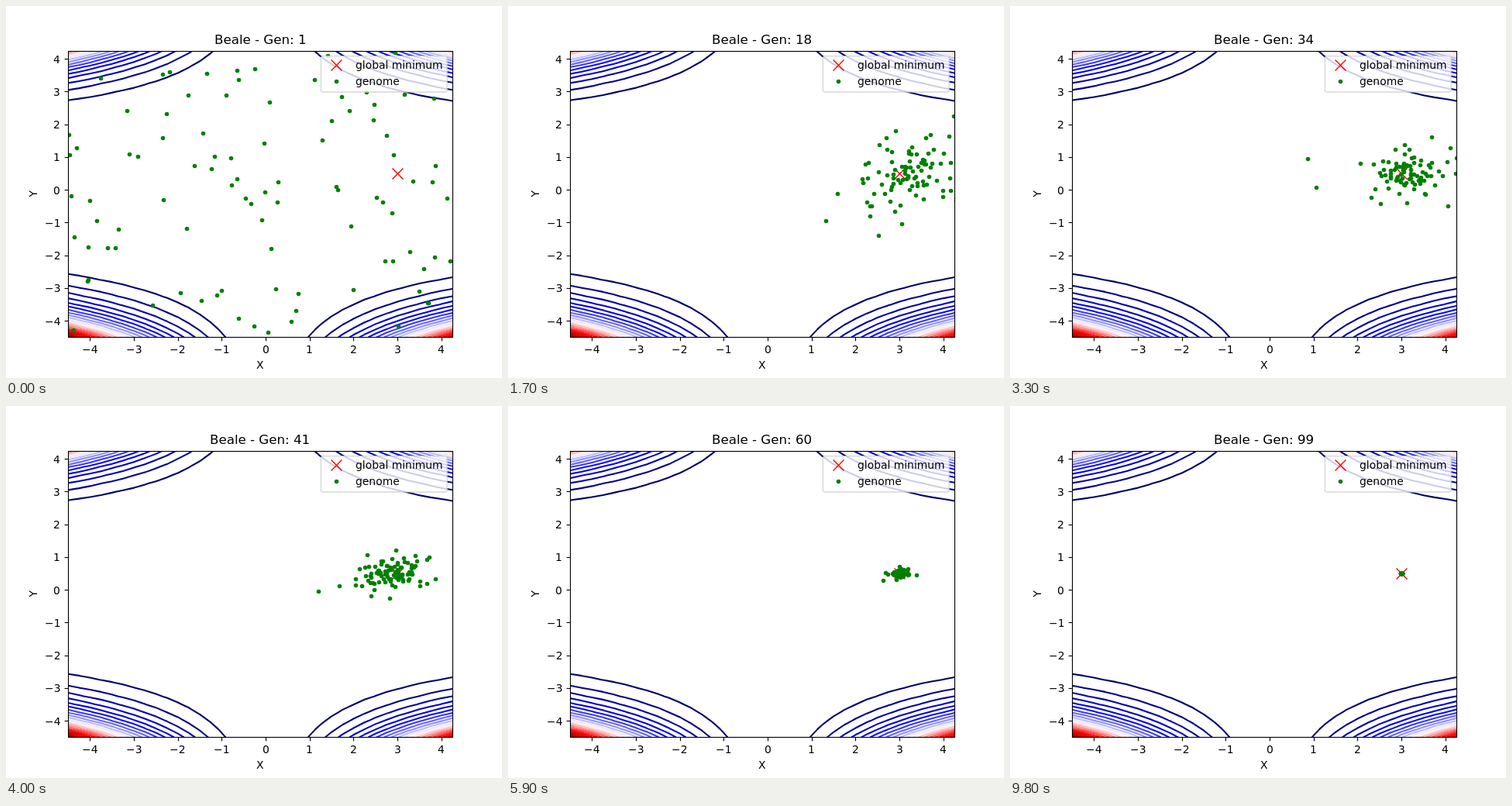
Recreate the animation shown at these times as an HTML page with a canvas. Size 640x480 px, loop 9900 ms.

```html
<!DOCTYPE html>
<html lang="en">
<head>
<meta charset="utf-8">
<title>Beale</title>
<style>
html, body { margin: 0; width: 100%; height: 100%; overflow: hidden; background: #fff; }
canvas { display: block; }
</style>
</head>
<body>
<canvas id="stage" width="640" height="480"></canvas>
<script>
const ctx = document.getElementById('stage').getContext('2d');
const LEFT = 80, TOP = 57.6, WIDTH = 496, HEIGHT = 369.6;
const MIN = -4.5, MAX = 4.25, STEP = 0.25;
const GENERATIONS = 99, POPULATION = 94;
const TAU = Math.PI * 2;

const px = x => LEFT + (x - MIN) / (MAX - MIN) * WIDTH;
const py = y => TOP + (MAX - y) / (MAX - MIN) * HEIGHT;
const snap = v => Math.round(v) + 0.5;
const beale = (x, y) =>
  (1.5 - x + x * y) ** 2 + (2.25 - x + x * y ** 2) ** 2 + (2.625 - x + x * y ** 3) ** 2;

// Blue - white - red colour map with dark ends
function seismic(v) {
  const byte = c => Math.round(255 * Math.max(0, Math.min(1, c)));
  const r = v > 0.75 ? 1 - (v - 0.75) * 2 : (v - 0.25) * 4;
  const g = v < 0.5 ? (v - 0.25) * 4 : (0.75 - v) * 4;
  const b = v < 0.25 ? 0.3 + 2.8 * v : (0.75 - v) * 4;
  return `rgb(${byte(r)},${byte(g)},${byte(b)})`;
}

// Marching squares on the sampled function
function contour(level) {
  const path = new Path2D();
  for (let x = MIN; x < MAX; x += STEP) {
    for (let y = MIN; y < MAX; y += STEP) {
      const corners = [[x, y], [x + STEP, y], [x + STEP, y + STEP], [x, y + STEP]]
        .map(([a, b]) => [a, b, beale(a, b) - level]);
      const hits = [];
      corners.forEach((p, i) => {
        const q = corners[(i + 1) % 4];
        if (p[2] > 0 === q[2] > 0) return;
        const f = p[2] / (p[2] - q[2]);
        hits.push([px(p[0] + (q[0] - p[0]) * f), py(p[1] + (q[1] - p[1]) * f)]);
      });
      for (let i = 0; i + 1 < hits.length; i += 2) {
        path.moveTo(...hits[i]);
        path.lineTo(...hits[i + 1]);
      }
    }
  }
  return path;
}

const contours = Array.from({ length: 22 }, (_, i) => {
  const level = (i + 1) * 8000;
  return { path: contour(level), color: seismic(level / 184000) };
});

// Swarm spread at key generations: generation, spread in x, spread in y
const spreads = [
  [1, 2.3, 2.1],
  [18, 0.65, 0.75],
  [41, 0.5, 0.35],
  [60, 0.13, 0.06],
  [99, 0.006, 0.004]
];

function random(seed) {
  let s = seed * 0x9E3779B1 | 0;
  return () => {
    s = s + 0x6D2B79F5 | 0;
    let t = Math.imul(s ^ s >>> 15, s | 1);
    t ^= t + Math.imul(t ^ t >>> 7, t | 61);
    return ((t ^ t >>> 14) >>> 0) / 4294967296;
  };
}

// A uniform start, then a cloud that closes in on the minimum at (3, 0.5)
function genomes(gen) {
  const rnd = random(gen);
  const crowd = place => Array.from({ length: POPULATION }, place);
  if (gen === 1) return crowd(() => [LEFT + rnd() * WIDTH, TOP + rnd() * HEIGHT]);

  const next = spreads.findIndex(s => s[0] >= gen);
  const a = spreads[next - 1], b = spreads[next];
  const f = (gen - a[0]) / (b[0] - a[0]);
  const [, sx, sy] = a.map((v, i) => v * (b[i] / v) ** f);
  const cx = 3 - 2.5 * Math.exp((1 - gen) / 5) + 0.4 * Math.exp(-(((gen - 20) / 10) ** 2));
  return crowd(() => {
    const r = Math.sqrt(-2 * Math.log(1 - rnd())) * (0.3 + 1.2 * rnd());
    const angle = rnd() * TAU;
    const u = r * Math.cos(angle), v = r * Math.sin(angle);
    return [px(cx + sx * u), py(0.5 + sy * (0.2 * u + 0.95 * v))];
  });
}

function line(x1, y1, x2, y2) {
  ctx.beginPath();
  ctx.moveTo(x1, y1);
  ctx.lineTo(x2, y2);
  ctx.stroke();
}

// Text starts on a whole pixel; align is the share of the width left of x
function text(str, x, y, align = 0.5, size = 13.89) {
  ctx.fillStyle = '#000';
  ctx.font = `${size}px "DejaVu Sans", sans-serif`;
  const { width, actualBoundingBoxLeft } = ctx.measureText(str);
  const bearing = -actualBoundingBoxLeft;
  ctx.fillText(str, Math.round(x - width * align + bearing) - Math.floor(bearing), y);
}

function dot([x, y]) {
  ctx.fillStyle = '#008000';
  ctx.beginPath();
  ctx.arc(snap(x), snap(y), 2.78, 0, TAU);
  ctx.fill();
}

function cross(x, y) {
  const h = 6.94;
  ctx.strokeStyle = '#f00';
  ctx.lineWidth = 1.39;
  line(x - h, y - h, x + h, y + h);
  line(x - h, y + h, x + h, y - h);
}

function axes() {
  ctx.strokeStyle = '#000';
  ctx.lineWidth = 1.11;
  ctx.strokeRect(80.5, 58.5, 496, 369);
  for (let v = -4; v <= 4; v++) {
    const label = String(v).replace('-', '\u2212');
    const x = snap(px(v)), y = snap(py(v));
    line(x, 427.5, x, 432.4);
    line(80.5, y, 75.6, y);
    text(label, px(v), 448);
    text(label, 70.3, Math.round(py(v) + 5.45), 1);
  }
  text('X', 328, 468);
  ctx.save();
  ctx.translate(40, 242.4);
  ctx.rotate(-Math.PI / 2);
  text('Y', 0, 0);
  ctx.restore();
}

function legend() {
  ctx.beginPath();
  ctx.roundRect(406.4, 64.6, 162.7, 46.4, 2.78);
  ctx.fillStyle = 'rgba(255,255,255,0.8)';
  ctx.fill();
  ctx.strokeStyle = 'rgba(204,204,204,0.8)';
  ctx.lineWidth = 1.39;
  ctx.stroke();
  cross(426.5, 76.5);
  dot([426, 97]);
  text('global minimum', 450.6, 81, 0);
  text('genome', 450.6, 102, 0);
}

function draw(gen) {
  ctx.fillStyle = '#fff';
  ctx.fillRect(0, 0, 640, 480);
  ctx.save();
  ctx.beginPath();
  ctx.rect(LEFT, 58, WIDTH, 369);
  ctx.clip();
  ctx.lineWidth = 2.08;
  ctx.lineCap = 'round';
  for (const { path, color } of contours) {
    ctx.strokeStyle = color;
    ctx.stroke(path);
  }
  ctx.lineCap = 'butt';
  cross(505.5, 216.5);
  genomes(gen).forEach(dot);
  ctx.restore();
  axes();
  text(`Beale - Gen: ${gen}`, 328, 49, 0.5, 16.67);
  legend();
}

let shown = 0;
function tick() {
  const gen = Math.floor(performance.now() / 100) % GENERATIONS + 1;
  if (gen !== shown) draw(shown = gen);
  requestAnimationFrame(tick);
}
tick();
</script>
</body>
</html>
```
